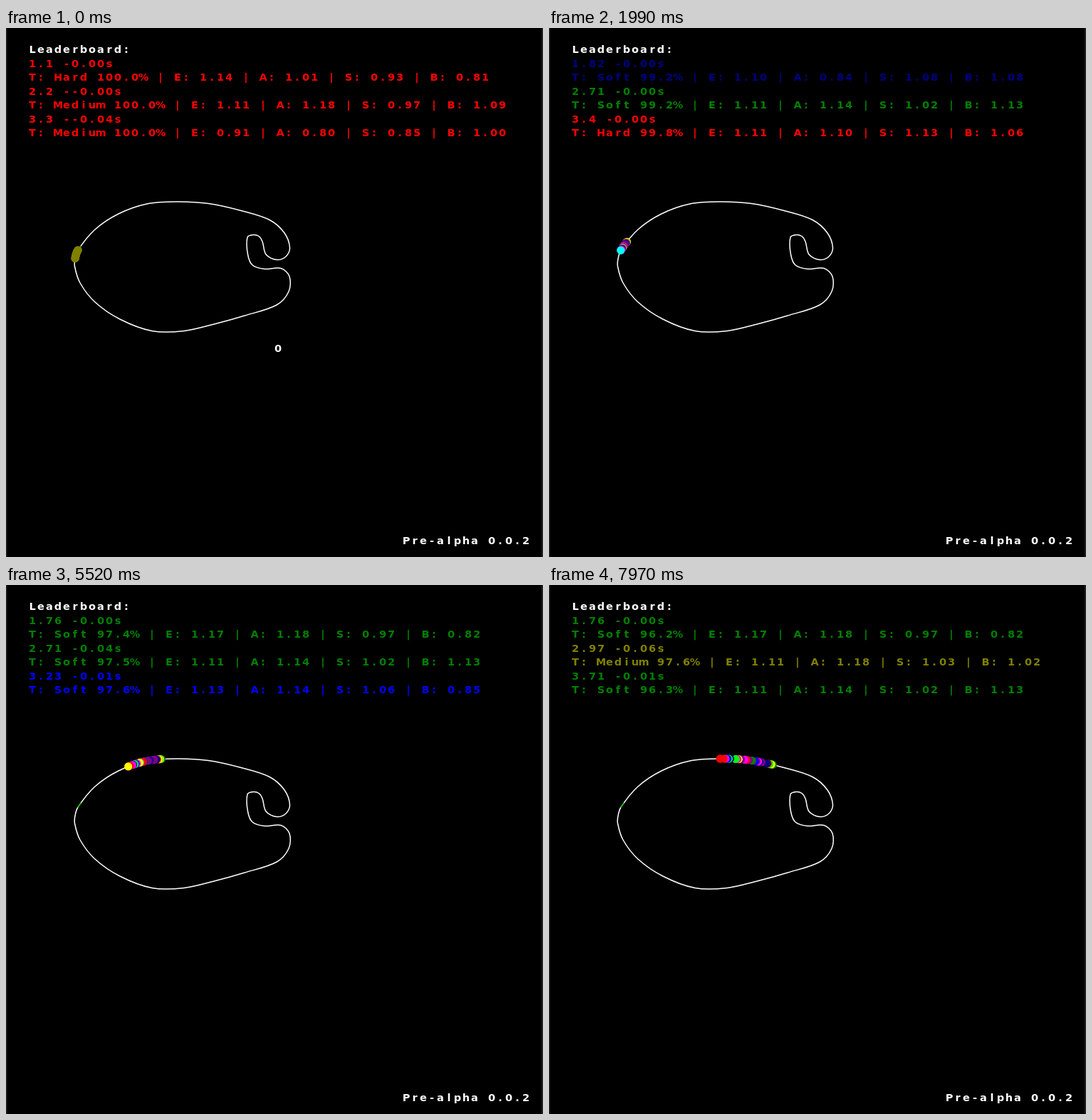
Animation, 754 px wide and 743 px high, one loop 8 s. Source, as an HTML page with a canvas:

```html
<!DOCTYPE html>
<html lang="en">
<head>
<meta charset="utf-8">
<title>Race leaderboard</title>
<style>
html, body { margin: 0; width: 100%; height: 100%; overflow: hidden; background: #000; }
canvas { display: block; width: 100%; height: 100%; }
</style>
</head>
<body>
<canvas id="stage" width="754" height="743"></canvas>
<script>
const ctx = document.getElementById('stage').getContext('2d');
const LOOP = 8, START = 0.26, CELL = 12, LINE = 19.5, CARS = 28;

// Key points of the circuit, clockwise from the back of the grid
const corners = [
  [97,324],[101,312],[125,283],[158,261],[198,247],[240,244],[284,246.5],[330,256.5],
  [370,269.5],[391,288],[398.5,309],[393,321],[380,325.5],[365,318],[360,300],[355,292.5],
  [347,290.5],[339,294],[339.5,318],[346,333],[363,338.5],[386,337.5],[398,349],[397,370],
  [380,389],[335,404],[292,416],[250,425.5],[205,425.5],[160,409],[125,385],[104,358],[96.5,335]
];

// Smooth closed path whose tangents follow the neighbouring points
function smoothPath(pts) {
  const at = i => pts[(i + pts.length) % pts.length];
  const dist = i => Math.hypot(at(i + 1)[0] - at(i)[0], at(i + 1)[1] - at(i)[1]);
  const handle = (i, reach) => at(i).map((v, a) =>
    v + reach / 3 * (at(i + 1)[a] - at(i - 1)[a]) / (dist(i - 1) + dist(i)));
  return 'M' + pts[0] + pts.map((p, i) =>
    `C${handle(i, dist(i))} ${handle(i + 1, -dist(i))} ${at(i + 1)}`).join('') + 'Z';
}

const route = document.createElementNS('http://www.w3.org/2000/svg', 'path');
route.setAttribute('d', smoothPath(corners));
const circuit = new Path2D(route.getAttribute('d'));

// Distance run: a standstill that blends into constant speed
const run = (t, go, speed) => speed * 0.5 * Math.log(1 + Math.exp((t - go) / 0.5));
const frontAt = t => 12.6 + run(t, 1.95, 39.4);
const tailAt = t => run(t, 1.83, 28.5);

// Car number: colour, tyre, then the E, A, S, B ratings
const drivers = {
  1: 'red Hard 1.14 1.01 0.93 0.81',
  2: 'red Medium 1.11 1.18 0.97 1.09',
  3: 'red Medium 0.91 0.80 0.85 1.00',
  4: 'red Hard 1.11 1.10 1.13 1.06',
  21: 'blue Medium 1.16 1.11 0.85 0.87',
  23: 'blue Soft 1.13 1.14 1.06 0.85',
  57: 'cyan Soft 1.13 1.08 1.09 1.16',
  68: 'maroon Medium 0.98 0.97 0.95 1.13',
  71: 'green Soft 1.11 1.14 1.02 1.13',
  76: 'green Soft 1.17 1.18 0.97 0.82',
  82: 'navy Soft 1.10 0.84 1.08 1.08',
  97: 'olive Medium 1.11 1.18 1.03 1.02'
};
const wear = { Soft: 0.479, Medium: 0.316, Hard: 0.138 };

// Top three from each time on
const standings = [
  [0, [1, 2, 3]], [START, [57, 68, 21]], [1.5, [82, 71, 4]], [3.1, [76, 71, 4]],
  [4.15, [76, 71, 23]], [6.75, [76, 71, 97]], [7.2, [76, 97, 71]]
];

let seed = 11;
const random = () => (seed = seed * 16807 % 2147483647) / 2147483647;
const palette = ['red', 'lime', 'blue', 'yellow', 'cyan', 'magenta', 'maroon', 'green', 'navy', 'purple'];
const tailColors = ['cyan', 'magenta', 'yellow', 'red'];
const cars = Array.from({ length: CARS }, (_, i) => ({
  color: palette[Math.floor(random() * palette.length)],
  place: (i + 0.5) / CARS, phase: random() * 6.28, rate: 0.4 + random() * 0.8
}));

// Fixed-pitch lettering: every character centred in its cell
function write(text, x, y, color) {
  ctx.fillStyle = color;
  [...text].forEach((ch, i) => ctx.fillText(ch, x + CELL * (i + 0.5), y));
}

function dot(s, color) {
  const { x, y } = route.getPointAtLength(s);
  ctx.fillStyle = color;
  ctx.beginPath();
  ctx.arc(x, y, 5.6, 0, 7);
  ctx.fill();
}

function drawTrack() {
  ctx.lineWidth = 1.5;
  ctx.strokeStyle = '#fff';
  ctx.stroke(circuit);
  // Start line
  const a = route.getPointAtLength(12), b = route.getPointAtLength(20);
  ctx.strokeStyle = '#00b400';
  ctx.beginPath();
  ctx.moveTo(a.x, a.y);
  ctx.lineTo(b.x, b.y);
  ctx.stroke();
}

function drawCars(t) {
  const front = frontAt(t), tail = tailAt(t);
  const paint = color => t < START ? 'olive' : color;
  dot(front, paint('green'));
  cars.map(c => ({ color: c.color, f: c.place + 0.05 * Math.sin(c.phase + c.rate * t) }))
    .filter(c => c.f > 0 && c.f < 1)
    .sort((a, b) => b.f - a.f)
    .forEach(c => dot(tail + (front - tail) * c.f, paint(c.color)));
  dot(tail, paint(tailColors[Math.max(0, Math.floor((t - 1) / 2))]));
}

function drawBoard(t) {
  write('Leaderboard:', 31, 35, '#fff');
  const second = Math.min(0.06, Math.max(0, (t - 3.3) * 0.0165));
  const gaps = t < START ? ['-0.00', '--0.00', '--0.04']
    : ['-0.00', '-' + second.toFixed(2), t < 3.5 ? '-0.00' : '-0.01'];
  const [, topThree] = standings.filter(([from]) => from <= t).pop();
  topThree.forEach((id, i) => {
    const [color, tyre, e, a, s, b] = drivers[id].split(' ');
    const left = 100 - Math.max(0, t - START) * wear[tyre] / Math.sqrt(s);
    const y = 35 + LINE * (1 + 2 * i);
    write(`${i + 1}.${id} ${gaps[i]}s`, 31, y, color);
    write(`T: ${tyre} ${left.toFixed(1)}% | E: ${e} | A: ${a} | S: ${s} | B: ${b}`, 31, y + LINE, color);
  });
}

function draw(now) {
  const t = now / 1000 % LOOP;
  ctx.fillStyle = '#000';
  ctx.fillRect(0, 0, 754, 743);
  ctx.fillStyle = '#222';
  ctx.fillRect(0, 0, 1.5, 743);
  ctx.fillRect(752, 0, 2, 743);
  ctx.font = 'bold 14.5px "DejaVu Sans", sans-serif';
  ctx.textAlign = 'center';
  drawTrack();
  drawCars(t);
  drawBoard(t);
  if (t < START) write('0', 376, 455, '#fff');
  write('Pre-alpha 0.0.2', 556, 725, '#fff');
  requestAnimationFrame(draw);
}
requestAnimationFrame(draw);
</script>
</body>
</html>
```
